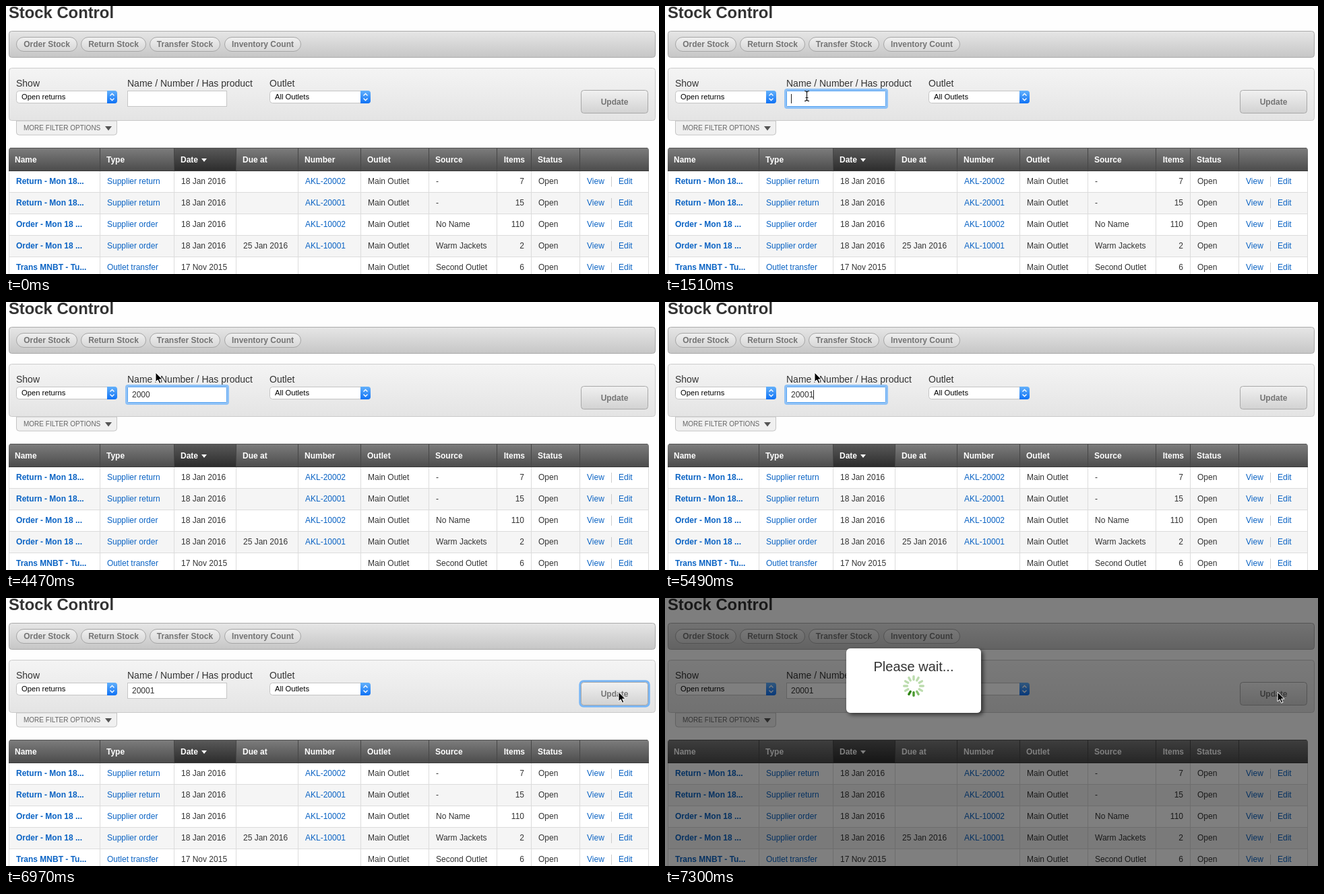
An HTML page that plays this animation: 969x399 px, repeating every 8000 ms.

```html
<!DOCTYPE html>
<html lang="en">
<head>
<meta charset="utf-8">
<title>Stock Control</title>
<style>
  html, body { margin: 0; width: 100%; height: 100%; overflow: hidden; background: #fefefe; }
  svg { display: block; font: 12px "Liberation Sans", Arial, sans-serif; fill: #333; }
  .bold { font-weight: bold; }
  .link { fill: #0a63c4; }
  .soft { fill: #747474; }
  .white { fill: #fff; }
</style>
</head>
<body>
<svg id="stage" width="969" height="399" viewBox="0 0 969 399"></svg>
<script>
const LOOP = 8000;

const text = (x, y, str, cls = '', extra = '') =>
  `<text x="${x}" y="${y}" class="${cls}" ${extra}>${str}</text>`;
const rect = (x, y, w, h, fill, stroke = 'none', r = 0, extra = '') =>
  `<rect x="${x}" y="${y}" width="${w}" height="${h}" rx="${r}" fill="${fill}" stroke="${stroke}" ${extra}/>`;
const line = (x1, y1, x2, y2, stroke) =>
  `<path d="M${x1} ${y1}L${x2} ${y2}" stroke="${stroke}"/>`;
const shape = (d, fill) => `<path d="${d}" fill="${fill}"/>`;
const gradient = (id, top, bottom) =>
  `<linearGradient id="${id}" x2="0" y2="1"><stop stop-color="${top}"/><stop offset="1" stop-color="${bottom}"/></linearGradient>`;

const defs = `<defs>
  ${gradient('bar', '#e6e6e6', '#c6c6c6')}
  ${gradient('pill', '#f0f0f0', '#d6d6d6')}
  ${gradient('panel', '#f4f4f4', '#e4e4e4')}
  ${gradient('button', '#f1f1f1', '#d2d2d2')}
  ${gradient('hover', '#f7f7f7', '#dadada')}
  ${gradient('pressed', '#c6c6c6', '#d2d2d2')}
  ${gradient('blue', '#64b1fb', '#0f72f5')}
  ${gradient('head', '#7d7d7d', '#4b4b4b')}
  ${gradient('sorted', '#5a5a5a', '#2b2b2b')}
  <filter id="shadow" x="-10%" y="-10%" width="125%" height="135%">
    <feDropShadow dx="3" dy="3" stdDeviation="3" flood-opacity=".6"/>
  </filter>
</defs>`;

function toolbar() {
  const pills = [['Order Stock', 15, 91], ['Return Stock', 111, 97],
    ['Transfer Stock', 213, 105], ['Inventory Count', 324, 114]];
  return rect(4.5, 37.5, 959, 39, 'url(#bar)', '#a9a9a9', 4) +
    pills.map(([label, x, w]) =>
      rect(x + .5, 46.5, w - 1, 21, 'url(#pill)', '#a6a6a6', 10.5) +
      text(x + w / 2, 61, label, 'bold soft', 'text-anchor="middle"')).join('');
}

function select(x, label) {
  return rect(x + .5, 126.5, 149, 18, '#fff', '#c4c4c4', 4) +
    shape(`M${x + 135} 126h11a4 4 0 0 1 4 4v11a4 4 0 0 1 -4 4h-11z`, 'url(#blue)') +
    `<path d="M${x + 139.5} 133.5l3-3 3 3m0 4l-3 3-3-3" fill="none" stroke="#fff" stroke-width="1.4"/>` +
    text(x + 8, 139, label, '', 'style="font-size:11.2px;fill:#000"');
}

function filters() {
  const label = (x, str) => text(x, 120, str, '', 'font-size="14"');
  return rect(4.5, 92.5, 959, 78, 'url(#panel)', '#cacaca', 4) +
    shape('M15.5 171v17a4 4 0 0 0 4 4h141a4 4 0 0 0 4 -4v-17z', '#f0f0f0" stroke="#c4c4c4') +
    text(26, 185, 'MORE FILTER OPTIONS', '', 'style="font-size:10px;fill:#666"') +
    shape('M147 179h10l-5 6.5z', '#555') +
    label(15, 'Show') + label(180, 'Name / Number / Has product') + label(391, 'Outlet') +
    select(15, 'Open returns') + select(391, 'All Outlets') +
    rect(180.5, 126.5, 147, 23, '#fff', '#c6c6c6') +
    `<g id="inputFocus">${rect(178.5, 124.5, 151, 27, 'none', '#8fc2f7', 2.5, 'stroke-width="3"')}
      ${rect(180.5, 126.5, 147, 23, 'none', '#5aa5f2', 1)}</g>` +
    text(187, 142, '', '', 'id="typed"') +
    rect(0, 131, 1, 14, '#222', 'none', 0, 'id="caret"') +
    rect(852, 124, 102, 37, 'none', '#79b6f5', 5, 'id="buttonFocus" stroke-width="3.5"') +
    rect(853.5, 125.5, 99, 34, 'url(#button)', '#a8a8a8', 4, 'id="button"') +
    text(903, 147, 'Update', 'bold soft', 'text-anchor="middle"');
}

function table() {
  const edges = [140, 250, 342, 434, 527, 628, 729, 780, 852];
  const starts = [15, 150, 260, 352, 444, 537, 638, 769, 790];
  const titles = ['Name', 'Type', 'Date', 'Due at', 'Number', 'Outlet', 'Source', 'Items', 'Status'];
  const rows = [
    ['Return - Mon 18...', 'Supplier return', '18 Jan 2016', '', 'AKL-20002', 'Main Outlet', '-', 7],
    ['Return - Mon 18...', 'Supplier return', '18 Jan 2016', '', 'AKL-20001', 'Main Outlet', '-', 15],
    ['Order - Mon 18 ...', 'Supplier order', '18 Jan 2016', '', 'AKL-10002', 'Main Outlet', 'No Name', 110],
    ['Order - Mon 18 ...', 'Supplier order', '18 Jan 2016', '25 Jan 2016', 'AKL-10001', 'Main Outlet', 'Warm Jackets', 2],
    ['Trans MNBT - Tu...', 'Outlet transfer', '17 Nov 2015', '', '', 'Main Outlet', 'Second Outlet', 6]
  ];
  const classes = ['bold link', 'link', '', '', 'link'];
  const align = i => i === 7 ? 'text-anchor="end"' : '';

  const header = shape('M4 246v-31a4 4 0 0 1 4 -4h942a4 4 0 0 1 4 4v31z', 'url(#head)') +
    rect(250, 211, 92, 35, 'url(#sorted)') +
    line(6, 211.5, 952, 211.5, '#555') + line(4, 245.5, 954, 245.5, '#3a3a3a') +
    edges.map(x => line(x - .5, 212, x - .5, 245, '#464646')).join('') +
    titles.map((title, i) =>
      text(i === 7 ? 770 : starts[i] - (i ? 1 : 2), 233, title, 'bold white', align(i))).join('') +
    shape('M290 227h8l-4 5z', '#fff');

  const body = rows.map((row, r) => {
    const top = 246 + r * 32, y = top + 19;
    return rect(4, top, 950, 32, r % 2 ? '#f5f5f5' : '#fff') +
      line(4, top + 31.5, 954, top + 31.5, '#dcdcdc') +
      [...row, 'Open'].map((cell, i) => text(starts[i], y, cell, classes[i] || '', align(i))).join('') +
      text(862, y, 'View', 'link') + line(898.5, top + 8, 898.5, top + 23, '#ccc') +
      text(909, y, 'Edit', 'link');
  }).join('');
  return body + [5, ...edges, 954].map(x => line(x - .5, 246, x - .5, 399, '#dcdcdc')).join('') + header;
}

function dialog() {
  const spokes = Array.from({ length: 12 }, (_, i) =>
    `<path class="spoke" d="M0 -9.5V-14.3" transform="translate(369 131) rotate(${i * 30})" stroke-width="3.4" stroke-linecap="round"/>`);
  return `<g id="dialog">${rect(0, 0, 969, 399, '#000', 'none', 0, 'opacity=".5"')}
    ${rect(269, 75, 200, 96, '#fff', 'none', 6, 'filter="url(#shadow)"')}
    ${text(369, 109, 'Please wait...', '', 'font-size="20" text-anchor="middle"')}${spokes.join('')}</g>`;
}

const pointers = `<path id="arrow" d="M0 0V14L3.2 11L5.7 16.3L8 15.3L5.6 10.2H10Z" fill="#000" stroke="#fff" stroke-width="1"/>
  <g id="beam" fill="none"><path d="M-3 -7.5Q0 -7.5 .5 -5.5Q1 -7.5 4 -7.5M-3 7.5Q0 7.5 .5 5.5Q1 7.5 4 7.5M.5 -6V6M-1.5 2.5H2.5" stroke="#111" stroke-width="1.1"/></g>`;

document.getElementById('stage').innerHTML = defs +
  text(4, 18, 'Stock Control', 'bold', 'font-size="23.8"') +
  toolbar() + filters() + table() + dialog() + pointers;

const el = id => document.getElementById(id);
const show = (id, on) => el(id).setAttribute('visibility', on ? 'visible' : 'hidden');
const spokes = document.querySelectorAll('.spoke');

// Progress from 0 to 1 in equal jumps; the first jump falls on start, the last on end.
const stepped = (t, start, end, count) => t < start ? 0 :
  Math.min(1, (Math.floor((t - start) / (end - start) * (count - 1) + 1e-6) + 1) / count);
const mix = (a, b, p) => a + (b - a) * p;
const easeOut = p => 1 - (1 - p) ** 2;
const smooth = p => p * p * (3 - 2 * p);

function pointerAt(t) {
  if (t < 1990) {
    const p = stepped(t, 600, 1220, 11);
    return [mix(-34, 210, easeOut(p)), mix(200, 134, easeOut(p))];
  }
  if (t < 5670) {
    const p = smooth(stepped(t, 1990, 2510, 9));
    return [mix(210, 222, p), mix(134, 105, p)];
  }
  if (t < 6490) {
    const p = stepped(t, 5670, 6430, 14);
    return [mix(222, 820, p ** 2.4), mix(105, 123, p ** 1.7)];
  }
  const p = easeOut(stepped(t, 6490, 6610, 3));
  return [mix(820, 909, p), mix(123, 140, p)];
}

const keyTimes = [2990, 3220, 3640, 4000, 5490];
const caretSpans = [[1510, 1990], [2510, 4470], [4950, 5970], [6430, 6910]];
const spokeColors = ['#2c8410', '#4a9a30', '#86bf70'];

function render(t) {
  const typed = keyTimes.filter(time => t >= time).length;
  el('typed').textContent = '20001'.slice(0, typed);
  el('caret').setAttribute('x', Math.round(187 + typed * 6.674));
  show('caret', caretSpans.some(([on, off]) => t >= on && t < off));
  show('inputFocus', t >= 1510 && t < 6910);

  const waiting = t >= 7090, pressed = t >= 6910 && !waiting;
  show('buttonFocus', pressed);
  el('button').setAttribute('fill', `url(#${pressed ? 'pressed' : t >= 6490 && !waiting ? 'hover' : 'button'})`);
  el('button').setAttribute('stroke', pressed ? '#858585' : '#a8a8a8');

  show('dialog', waiting);
  const lead = t < 7210 ? 5 : t < 7300 ? 6 : 7;
  spokes.forEach((spoke, i) =>
    spoke.setAttribute('stroke', spokeColors[(lead - i + 12) % 12] || '#bcdcae'));

  const [x, y] = pointerAt(t).map(Math.round);
  const overInput = x >= 180 && x < 328 && y >= 126 && y < 150;
  show('arrow', t >= 600 && !overInput);
  show('beam', t >= 600 && overInput);
  for (const id of ['arrow', 'beam']) el(id).setAttribute('transform', `translate(${x} ${y})`);
}

function frame() {
  render(performance.now() % LOOP);
  requestAnimationFrame(frame);
}
frame();
</script>
</body>
</html>
```
